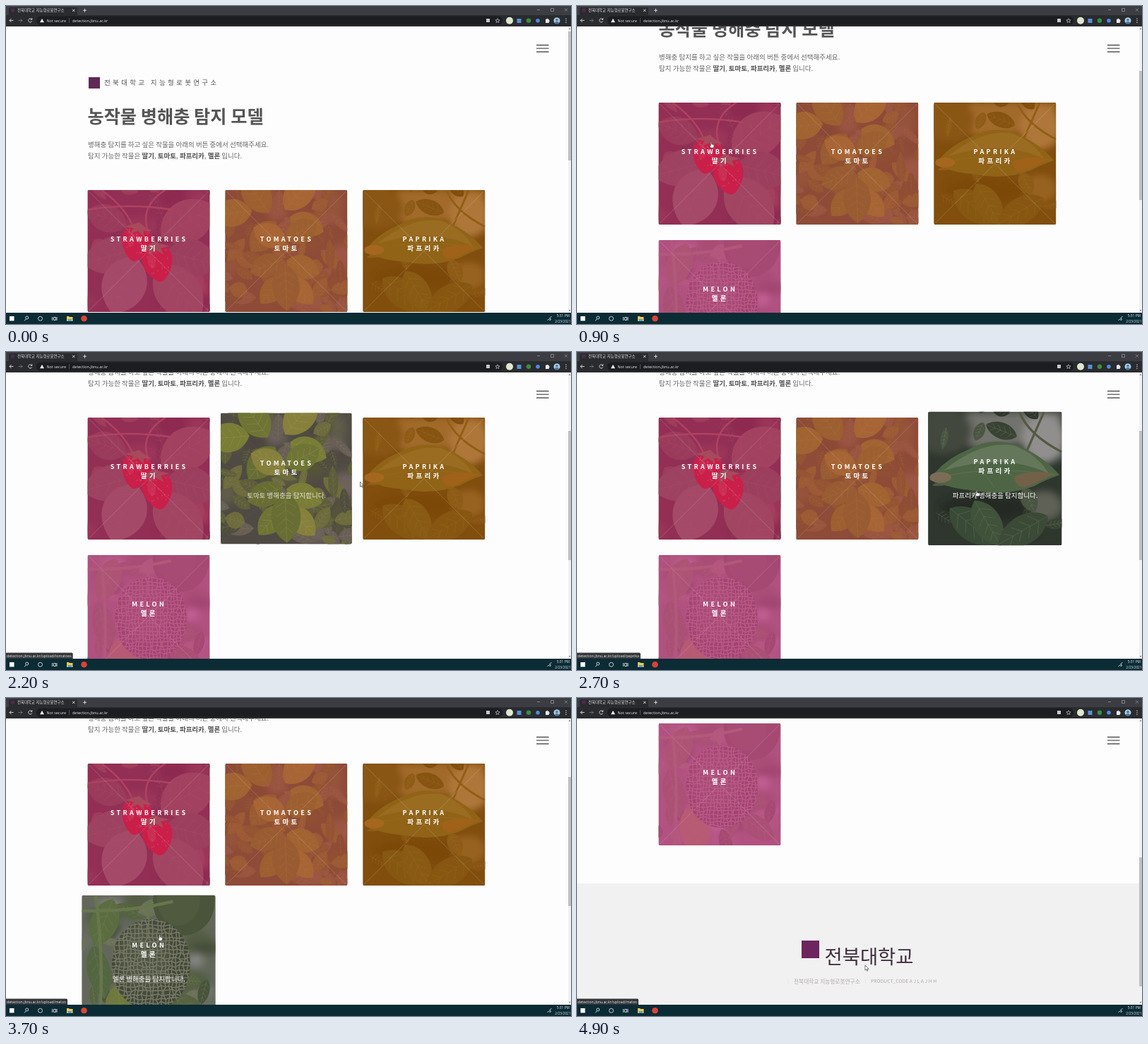
Recreate the animation shown at these times as an HTML page. Size 800x451 px, loop 5000 ms.

```html
<!DOCTYPE html>
<html lang="ko">
<head>
<meta charset="utf-8">
<style>
html, body { margin: 0; height: 100%; overflow: hidden; background: #fefdfe; }
svg { display: block; width: 100vw; height: 100vh; }
text { font-family: "Noto Sans CJK KR", "Noto Sans CJK", sans-serif; white-space: pre; word-spacing: -.05em; }
.ui text { font-family: "Open Sans", "Noto Sans CJK KR", sans-serif; font-size: 5.45px; fill: #e8eaed; word-spacing: 0; }
.body { font-size: 9.5px; font-weight: 300; fill: #666; }
.body tspan { font-weight: 700; fill: #505050; }
.wide { font-size: 9.5px; letter-spacing: 3.33px; }
.card text { text-anchor: middle; fill: #fff; }
.line { fill: none; stroke: #dfe1e5; stroke-width: .9; }
</style>
</head>
<body>
<svg viewBox="0 0 800 451">
  <defs>
    <clipPath id="view"><rect y="29" width="796" height="406"/></clipPath>
    <clipPath id="tile"><rect width="173" height="173" rx="2"/></clipPath>
    <clipPath id="rind"><rect x="39" y="31" width="101" height="117" rx="49" ry="55"/></clipPath>
    <filter id="soft"><feGaussianBlur stdDeviation="5"/></filter>
  </defs>
  <rect width="800" height="451" fill="#fefdfe"/>
  <g clip-path="url(#view)">
    <g id="page">
      <rect x="117" y="101" width="16" height="16" fill="#5f2a55"/>
      <text class="wide" x="139" y="112.3" font-weight="500" fill="#555">전북대학교 지능형로봇연구소</text>
      <text x="115.5" y="166" font-size="25.2" font-weight="700" fill="#555">농작물 병해충 탐지 모델</text>
      <text class="body" x="116" y="200">병해충 탐지를 하고 싶은 작물을 아래의 버튼 중에서 선택해주세요.</text>
      <text class="body" x="116" y="215.5">탐지 가능한 작물은 <tspan>딸기</tspan>, <tspan>토마토</tspan>, <tspan>파프리카</tspan>, <tspan>멜론</tspan> 입니다.</text>
      <g id="cards"></g>
      <rect y="683" width="796" height="200" fill="#f1f1f1"/>
      <rect x="318" y="764" width="25" height="25" fill="#6d2560"/>
      <text x="350.5" y="797" font-size="27.4" font-weight="300" fill="#40303f">전북대학교</text>
      <g font-size="7.7" font-weight="300" fill="#b3a9af">
        <text x="307" y="824.5">전북대학교 지능형로봇연구소</text>
        <text x="416" y="824" font-size="6.8">PRODUCT_CODE A J L A J H H</text>
      </g>
      <path d="M299 819v6M408.500 819v6" stroke="#ddd" stroke-width=".6"/>
    </g>
    <path d="M751 55.500h17.500M751 60.200h17.500M751 65h17.500" stroke="#555" stroke-width="1.300"/>
  </g>

  <g class="ui">
    <rect x="796" y="29" width="4" height="406" fill="#f1f1f1"/>
    <path d="M796.800 33l1.200-1.600 1.200 1.600zM796.800 431l1.200 1.600 1.200-1.600z" fill="#555"/>
    <rect id="thumb" x="796" y="36" width="4" height="183" fill="#c1c1c1"/>

    <rect width="800" height="14" fill="#3b3d42"/>
    <path d="M1 14q3 0 3-3V4q0-2 2-2h93q2 0 2 2v7q0 3 3 3z" fill="#292b2f"/>
    <rect y="13" width="800" height="16" fill="#292b2f"/>
    <rect x="43" y="14.500" width="660" height="12.500" rx="6" fill="#1c1d20"/>
    <rect x="7" y="3.500" width="5" height="5" fill="#4f2a50"/>
    <text x="16" y="8.200">전북대학교 지능형로봇연구소</text>
    <path class="line" d="M94 4.500l3.500 3.500m0-3.500l-3.500 3.500M109 6.200h5m-2.500-2.500v5" stroke-width=".7"/>
    <path class="line" d="M752 5.500h4M771.500 3.500h4v4h-4zM791 3.500l4 4m0-4l-4 4" opacity=".45"/>
    <path class="line" d="M10.500 20.500h-5.500m2.500-2.500l-2.500 2.500 2.500 2.500M36.500 19a2.600 2.600 0 1 0 .2 2.500m.1-4.200v2h-2"/>
    <path class="line" d="M17.500 20.500h5.500m-2.500-2.500l2.500 2.500-2.500 2.500" opacity=".4"/>
    <path d="M48 23.200l3-5.400 3 5.400z" fill="#e8eaed"/>
    <text x="57.500" y="22.500">Not secure</text>
    <path d="M89.500 17v7" stroke="#777" stroke-width=".6"/>
    <text x="94" y="22.500">detection.jbnu.ac.kr</text>
    <rect x="680" y="18" width="5" height="5" fill="#c5c8cc"/>
    <path class="line" d="M696 17.700l.9 2 2.200.2-1.700 1.400.6 2.200-2-1.200-2 1.200.6-2.200-1.700-1.400 2.200-.2z" style="stroke-width:.6"/>
    <circle cx="713" cy="20.800" r="5" fill="#dfe8cf"/>
    <rect x="723.500" y="18" width="6" height="6" fill="#5b8fd8"/>
    <circle cx="740" cy="20.800" r="3.200" fill="#3c8d40"/>
    <circle cx="753" cy="20.800" r="2.800" fill="#4d8de0"/>
    <path d="M764 18.700h1.400a1 1 0 0 1 2 0h1.400v1.600a1 1 0 0 1 0 2v1.600h-4.800z" fill="#e8eaed"/>
    <circle cx="780" cy="20.800" r="4.500" fill="#a9cbe4"/>
    <path d="M776.500 23.500q3.500-3 7 0-3 3.500-7 0z" fill="#47749a"/><circle cx="780" cy="19.800" r="1.700" fill="#47749a"/>
    <path d="M793 17.500v7" stroke="#dfe1e5" stroke-width="1.200" stroke-dasharray="1.200 1.500"/>

    <g id="status">
      <path id="bubble" fill="#35363a"/>
      <text id="link" x="1" y="432.600" style="font-size:5.200px"></text>
    </g>

    <rect y="435" width="800" height="16" fill="#0b2b35"/>
    <rect x="5" y="440" width="6.500" height="6.500" fill="#fff"/>
    <path class="line" d="M26 446.500l2.300-2.700M31.700 442a2 2 0 1 1-4 0 2 2 0 1 1 4 0M65.500 441v5m2-4.500h3v4h-3zM72 441v5"/>
    <circle class="line" cx="48.500" cy="443.300" r="3"/>
    <path d="M86 440h3l1 1h4.500v6h-8.500z" fill="#f3c84b"/><path d="M87.500 444h5.500v3h-5.500z" fill="#4ba3d9"/>
    <circle cx="110.500" cy="443.300" r="4.300" fill="#db4437"/>
    <path class="line" d="M766.500 446q2-3 3-1t2-1l-2-1 3-3"/>
    <g text-anchor="end"><text x="798" y="441.300" style="font-size:4.900px">5:31 PM</text><text x="799.500" y="448.800" style="font-size:4.700px">2/23/2021</text></g>
  </g>
  <g id="cursor" stroke="#222" stroke-width=".6" stroke-linejoin="round" fill="#fff">
    <path id="arrow" d="M0 0v7.200l1.700-1.500 1.100 2.500 1.100-.5-1.100-2.400h2.200z"/>
    <path id="hand" d="M-.8 0q.8-.9 1.500 0v3l2.600.6q1 .3.800 1.400l-.6 3.200h-4.100l-2-3.200q0-1 1.800.2z"/>
  </g>
</svg>
<script>
const $ = id => document.getElementById(id);
const LOOP = 5000, STEP = 100, SIZE = 173;

let seed = 7;
const rnd = () => (seed = seed * 16807 % 2147483647) / 2147483647;
const jit = n => (rnd() - .5) * n;
const range = (n, f) => Array.from({ length: n }, (_, i) => f(i)).join('');
const shape = (d, fill, more = '') => `<path d="${d}" fill="${fill}" ${more}/>`;
const oval = (x, y, rx, ry, fill, more = '') => `<ellipse cx="${x}" cy="${y}" rx="${rx}" ry="${ry}" fill="${fill}" ${more}/>`;
const stroke = (d, col, w) => `<path d="${d}" fill="none" stroke="${col}" stroke-width="${w}"/>`;
const base = col => `<rect width="173" height="173" fill="${col}"/>`;
const blobs = (n, cols) => `<g filter="url(#soft)">${range(n, i =>
  oval(rnd() * SIZE, rnd() * SIZE, 8 + rnd() * 20, 6 + rnd() * 14, cols[i % cols.length]))}</g>`;
const foliage = (n, cols) => range(n, i =>
  leaf(rnd() * SIZE, rnd() * SIZE, 18 + rnd() * 26, 6 + rnd() * 9, rnd() * 360, cols[i % cols.length]));

function leaf(x, y, len, w, angle, fill, rib = '#a5b584') {
  const veins = range(4, i => {
    const a = len * (.18 + i * .17), b = a + len * .13, h = w * (.55 - i * .07);
    return `M${a} 0L${b} ${h}M${a} 0L${b} ${-h}`;
  });
  return `<g transform="translate(${x} ${y}) rotate(${angle})">` +
    shape(`M0 0C${len * .2} ${-w},${len * .75} ${-w},${len} 0C${len * .75} ${w},${len * .2} ${w},0 0`, fill) +
    `<g opacity=".3">${stroke(`M0 0H${len}${veins}`, rib, .8)}</g></g>`;
}

function berry(x, y, r, angle) {
  return `<g transform="translate(${x} ${y}) rotate(${angle}) scale(${r})">` +
    shape('M-.9-.5C-.6-1.100,.6-1.100,.9-.5C1.100.3,.4 1.200,0 1.250C-.4 1.200,-1.100.3,-.9-.5', '#f50a0a') +
    oval(-.35, -.1, .25, .45, '#ff6a50', 'opacity=".5"') +
    range(22, () => oval(jit(1.3), jit(1.500), .035, .05, '#f08050')) +
    shape('M-.9-.9L-.3-.85-.5-.45 0-.75.45-.4.35-.8.9-.85.3-1.100 0-1.300-.4-1.100z', '#7d9a4a') + '</g>';
}

function strawberries() {
  return base('#3b3d30') + blobs(14, ['#565640', '#2c2a24', '#80704c']) +
    foliage(24, ['#5b6a45', '#34402f', '#777150']) +
    leaf(104, 66, 88, 40, -30, '#6f8058') + leaf(55, 50, 60, 26, -160, '#56694b') +
    leaf(75, 82, 85, 34, 165, '#62805a') + leaf(112, 88, 74, 36, 14, '#5c7551') +
    leaf(68, 94, 88, 42, 112, '#799773') + leaf(98, 108, 96, 42, 50, '#6b8a62') +
    stroke('M20 0Q58 28 66 58M110 0Q62 30 98 82M0 28Q60 18 120 28', '#96805a', 2.5) +
    berry(69, 74, 22, 8) + berry(99, 102, 23, -10);
}

function tomatoes() {
  const green = ['#8fa83a', '#7e9b36', '#a3ad44', '#738f38'];
  let s = base('#4c5750') + blobs(24, ['#66745a', '#46504a', '#7d7b78', '#55653f']) +
    foliage(70, ['#61753f', '#4b5a45', '#74776c', '#7b8b45']);
  [[38, 30, 58, 26, 175], [62, 32, 62, 26, -125], [85, 28, 65, 26, -50], [72, 45, 55, 24, 130],
   [92, 38, 52, 22, 24], [86, 70, 50, 23, -28], [85, 75, 50, 23, 206], [82, 98, 50, 22, 158],
   [87, 100, 50, 22, 22], [85, 122, 52, 21, 132], [88, 124, 52, 21, 46], [85, 105, 66, 26, 88]]
    .forEach((p, i) => s += leaf(...p, green[i % 4], '#dde083'));
  return s;
}

function paprika() {
  return base('#2b382c') + `<g filter="url(#soft)">` +
    shape('M50 0H173V60L120 42 60 48 50 40z', '#96978f') + oval(150, 35, 28, 32, '#c4c2c1') +
    oval(20, 25, 38, 30, '#4c5545') + oval(150, 122, 24, 20, '#777a6a') + oval(75, 125, 60, 18, '#1c281f') + '</g>' +
    foliage(16, ['#3b4d36', '#28362a', '#55664a']) +
    stroke('M118 0Q130 30 173 52M150 0L128 50', '#66704a', 3) +
    leaf(28, 125, 75, 26, 38, '#3d5839') + leaf(60, 115, 68, 24, 60, '#486340') +
    leaf(155, 135, 75, 25, 150, '#3f5838') +
    shape('M2 88Q20 62 50 50 80 32 112 42 148 56 170 82 152 88 138 96 100 110 60 102 28 100 2 88', '#5d804f') +
    shape('M20 76Q70 36 112 44 142 56 156 80 100 52 20 76', '#819d70') +
    stroke('M10 86Q80 68 164 82M60 74L78 54M90 73L108 54M70 77L86 98M100 75L122 94', '#7f9970', .7) +
    shape('M112 84Q130 74 162 80 144 92 124 98 112 96 112 84', '#947a55') + oval(16, 85, 14, 7, '#a58d69');
}

function melon() {
  const n = 24, pts = Array.from({ length: n * n }, (_, i) =>
    [34 + i % n * 4.9 + jit(3.6), 28 + (i / n | 0) * 5.3 + jit(3.6)]);
  const net = pts.map((p, i) =>
    (i % n < n - 1 ? `M${p}L${pts[i + 1]}` : '') + (i < n * n - n ? `M${p}L${pts[i + n]}` : '')).join('');
  return base('#7d8470') + blobs(20, ['#b4b5b0', '#66734e', '#8a917c', '#4e5c3e']) +
    foliage(18, ['#697e48', '#55663f', '#8a9270']) +
    leaf(40, 5, 65, 24, 110, '#718d48') + leaf(15, 65, 70, 20, 78, '#66834a') +
    leaf(45, 115, 75, 28, 80, '#92a044') + leaf(115, 130, 60, 20, 35, '#6b7c4b') +
    oval(132, 8, 40, 44, '#56673f') + oval(125, 5, 28, 34, '#6b7a50', 'opacity=".5"') +
    stroke('M18 0Q30 90 22 173M0 20Q60 22 118 8M88 34Q80 20 92 8', '#849c5b', 4) +
    `<g clip-path="url(#rind)">${base('#4a573e')}${oval(80, 80, 34, 42, '#6c785c', 'opacity=".6" filter="url(#soft)"')}
    ${stroke(net, '#a09f82', 1.300)}</g>`;
}

const cards = [
  { x: 115.5, y: 261, en: 'STRAWBERRIES', ko: '딸기', tint: 'rgb(184,40,100)', art: strawberries, on: 1000, off: 1650 },
  { x: 310.3, y: 261, en: 'TOMATOES', ko: '토마토', tint: 'rgb(170,71,46)', art: tomatoes, on: 1650, off: 2150 },
  { x: 505.3, y: 261, en: 'PAPRIKA', ko: '파프리카', tint: 'rgb(166,88,1)', art: paprika, on: 2250, off: 3000 },
  { x: 115.5, y: 456, en: 'MELON', ko: '멜론', tint: 'rgb(199,61,136)', art: melon, on: 3050, off: 4420 }
];

$('cards').innerHTML = cards.map(c => `<g class="card" transform="translate(${c.x} ${c.y})">
  <g class="photo"><g clip-path="url(#tile)">${c.art()}
    <rect class="tint" width="173" height="173" fill="${c.tint}"/>
    <rect class="shade" width="173" height="173" fill="#333"/>
    <path class="cross" d="M2 2L171 171M171 2L2 171" stroke="#fff" stroke-width=".7"/></g></g>
  <g class="title wide"><text x="87.200" y="72.600" font-size="9.100" font-weight="900">${c.en}</text>
    <text x="87.200" y="85.800" font-weight="700">${c.ko}</text></g>
  <text class="note" x="86.800" y="113.500" font-size="9.500" font-weight="300">${c.ko} 병해충을 탐지합니다.</text></g>`).join('');
[...document.querySelectorAll('.card')].forEach((el, i) =>
  ['photo', 'tint', 'shade', 'cross', 'title', 'note'].forEach(k => cards[i][k] = el.querySelector('.' + k)));

const scrolls = [[300, 0], [900, 124], [1100, 168], [3800, 168], [4300, 251.5], [4700, 420]];
const moves = [[100, -10, 300], [500, 120, 240], [900, 190, 193], [1400, 204, 198], [1700, 370, 192], [2000, 430, 186],
  [2200, 501.5, 184], [2500, 590, 182], [2750, 560, 200], [3000, 220.5, 334], [3700, 217.5, 336],
  [4000, 217.5, 336], [4300, 363.5, 330], [4900, 408, 379]];

function at(keys, t, k = 1) {
  const i = keys.findIndex(p => p[0] > t);
  if (i === 0) return keys[0][k];
  if (i < 0) return keys[keys.length - 1][k];
  const a = keys[i - 1], b = keys[i];
  return a[k] + (b[k] - a[k]) * (t - a[0]) / (b[0] - a[0]);
}
const ease = ms => 1 - (1 - Math.min(1, Math.max(0, ms / 500))) ** 2.4;

function draw(t) {
  const top = at(scrolls, t), x = at(moves, t, 1), y = at(moves, t, 2);
  $('page').setAttribute('transform', `translate(0 ${-top})`);
  $('thumb').setAttribute('y', 36 + top * .4525);

  let over = false, linked;
  for (const c of cards) {
    const h = ease(t - c.on) - ease(t - c.off), dy = y + top - c.y;
    c.photo.setAttribute('transform', `translate(86.5 86.5) scale(${1 + h * .095}) translate(-86.5 -86.5)`);
    c.tint.setAttribute('opacity', .7 * (1 - h));
    c.shade.setAttribute('opacity', .35 * h);
    c.cross.setAttribute('opacity', .25 * (1 - h));
    c.title.setAttribute('transform', `translate(0 ${-6.5 * h})`);
    c.note.setAttribute('opacity', h);
    over ||= x > c.x && x < c.x + SIZE && dy > 0 && dy < SIZE;
    if (t >= c.on + 50) linked = c;
  }
  $('cursor').setAttribute('transform', `translate(${x} ${y})`);
  $('hand').style.display = over ? '' : 'none';
  $('arrow').style.display = over ? 'none' : '';

  $('status').style.display = linked ? '' : 'none';
  if (linked) {
    $('link').textContent = 'detection.jbnu.ac.kr/upload/' + linked.en.toLowerCase();
    const w = $('link').getComputedTextLength() + 3;
    $('bubble').setAttribute('d', `M0 426.5H${w - 1.5}q1.5 0 1.5 1.5V435H0z`);
  }
}

function tick() {
  draw(Math.floor(performance.now() % LOOP / STEP) * STEP);
  requestAnimationFrame(tick);
}
tick();
</script>
</body>
</html>
```
